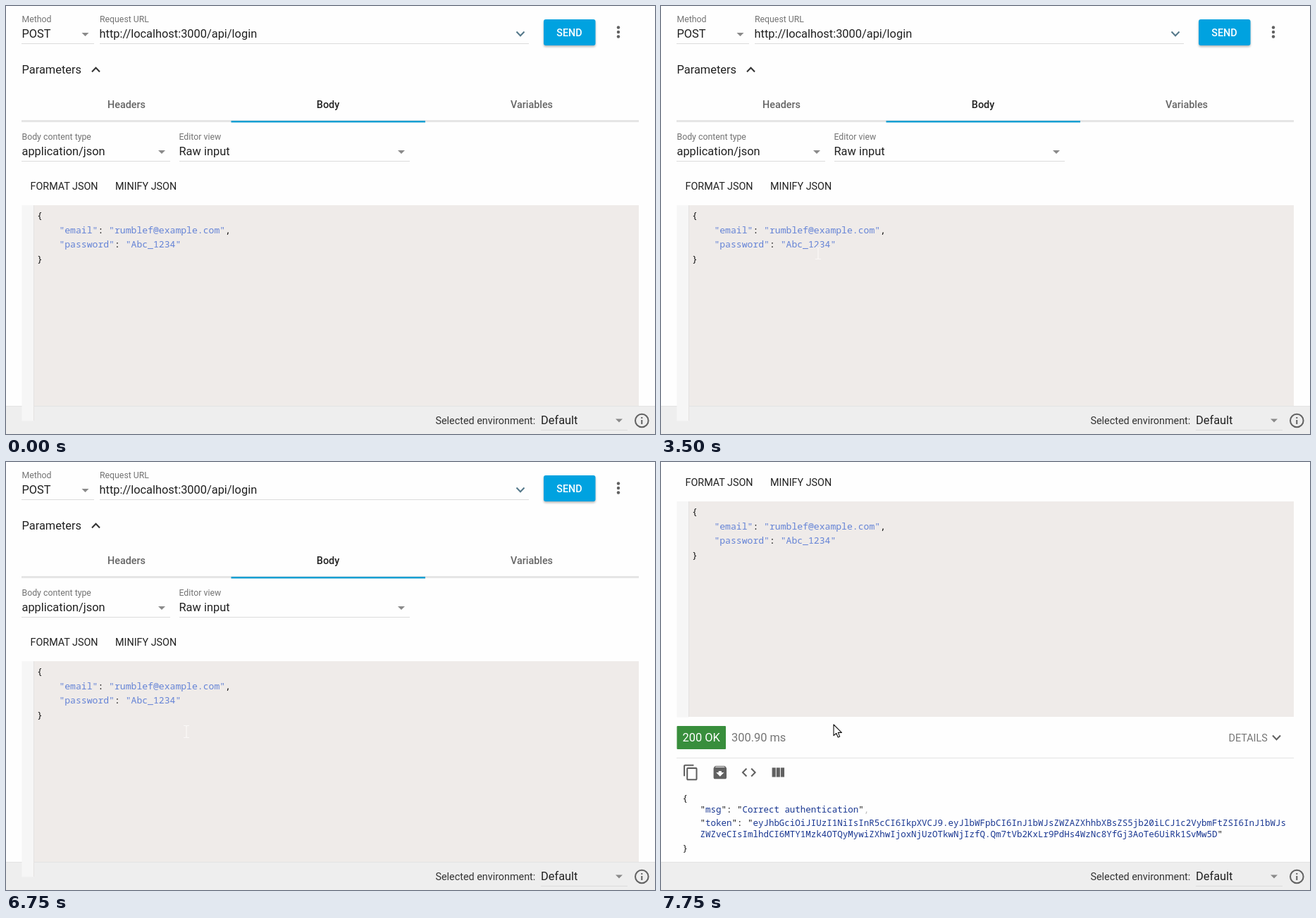
Animation of 921 by 608 pixels, one loop 8000 ms. Source, as an HTML page:

```html
<!DOCTYPE html>
<html lang="en">
<head>
<meta charset="utf-8">
<title>REST client login request</title>
<style>
html, body { margin: 0; width: 100%; height: 100%; overflow: hidden; background: #fefefe; }
svg { display: block; width: 100%; height: 100%; }
text { font: 16.4px Roboto, sans-serif; fill: #212121; white-space: pre; }
.label { font-size: 12.3px; fill: #737373; }
.small { font-size: 14.35px; }
.tab { font-size: 14.35px; font-weight: 500; fill: #656565; text-anchor: middle; }
.on { fill: #212121; }
.code { font: 13.1px "Noto Sans Mono", monospace; fill: #111; }
.code tspan { fill: #6483d6; }
.reply { font: 12.49px "Noto Sans Mono", monospace; fill: #111; }
.reply tspan { fill: #183691; }
.reply .faint { fill: #bbb; }
.grey { fill: #757575; }
.white { fill: #fff; }
.line { stroke: #dcdcdc; fill: none; }
.chevron { fill: none; stroke-width: 2; }
.drop { fill: #8a8a8a; }
.icon { fill: #616161; }
#send { fill: #00a2e0; filter: drop-shadow(0 2px 1.5px rgba(0,0,0,.28)); }
#send.pressed { filter: drop-shadow(0 3px 4px rgba(0,0,0,.4)); }
.pointer { display: none; }
.outline { fill: #fff; stroke: #111; stroke-width: 1.1; stroke-linejoin: round; }
</style>
</head>
<body>
<svg viewBox="0 0 921 608">
  <defs>
    <path id="caret" class="drop" d="M-5 -2.5H5L0 2.5Z"/>
    <path id="down" d="M-5.5 -3L0 2.7L5.5 -3"/>
  </defs>

  <g class="scroll">
    <text class="label" x="22.5" y="22.5">Method</text>
    <text x="22.5" y="45.2">POST</text>
    <use href="#caret" x="112.5" y="40.5"/>
    <text class="label" x="133" y="22.5">Request URL</text>
    <text x="132.5" y="45.2">http://localhost:3000/api/login</text>
    <use href="#down" class="chevron" stroke="#54788a" x="730" y="39.5"/>
    <path class="line" d="M22 53.5H125M133 53.5H742M22 220.5H233M246 220.5H573"/>
    <rect id="send" x="763" y="19" width="73.5" height="37" rx="3"/>
    <text class="tab white" x="799.5" y="43">SEND</text>
    <g class="icon">
      <circle cx="869" cy="30.5" r="2.2"/>
      <circle cx="869" cy="37" r="2.2"/>
      <circle cx="869" cy="43.5" r="2.2"/>
    </g>

    <text x="22.5" y="96">Parameters</text>
    <path class="chevron" stroke="#333" d="M122 93.5L127.5 87.8L133 93.5"/>

    <text class="tab" x="171" y="144.7">Headers</text>
    <text class="tab on" x="457" y="144.7">Body</text>
    <text class="tab" x="746" y="144.7">Variables</text>
    <rect x="22" y="162" width="876" height="3" fill="#e5e5e5"/>
    <rect x="319.5" y="163" width="275.5" height="2.5" fill="#179fd2"/>

    <text class="label" x="22.5" y="189.5">Body content type</text>
    <text x="22.5" y="212">application/json</text>
    <use href="#caret" x="221" y="207.5"/>
    <text class="label" x="245.5" y="189.5">Editor view</text>
    <text x="245.5" y="212">Raw input</text>
    <use href="#caret" x="561" y="207.5"/>

    <text class="small" x="34.5" y="261">FORMAT JSON</text>
    <text class="small" x="155" y="261">MINIFY JSON</text>

    <rect x="39" y="283" width="859" height="306" fill="#efebe9"/>
    <text class="code" x="44" y="302">{</text>
    <text class="code" x="75.4" y="322.5"><tspan>"email"</tspan>: <tspan>"rumblef@example.com"</tspan>,</text>
    <text class="code" x="75.4" y="343"><tspan>"password"</tspan>: <tspan>"Abc_1234"</tspan></text>
    <text class="code" x="44" y="363.5">}</text>

    <rect x="22.5" y="602" width="69.5" height="33" rx="1" fill="#388e3c"/>
    <text class="white" x="30.5" y="624">200 OK</text>
    <text class="grey" x="100" y="624">300.90 ms</text>
    <text class="small grey" x="805.5" y="623.5">DETAILS</text>
    <use href="#down" class="chevron" stroke="#616161" x="873.5" y="618.5"/>
    <path class="line" stroke-opacity=".8" d="M22 647.5H898"/>
    <g class="icon">
      <path transform="translate(30 655.7) scale(1.025)" d="M16 1H4c-1.1 0-2 .9-2 2v14h2V3h12V1zm3 4H8c-1.1 0-2 .9-2 2v14c0 1.1.9 2 2 2h11c1.1 0 2-.9 2-2V7c0-1.1-.9-2-2-2zm0 16H8V7h11v14z"/>
      <path transform="translate(71.5 655.7) scale(1.025)" d="M20.5 5.2l-1.4-1.7C18.9 3.2 18.5 3 18 3H6c-.5 0-.9.2-1.2.5L3.5 5.2C3.2 5.6 3 6 3 6.5V19c0 1.1.9 2 2 2h14c1.1 0 2-.9 2-2V6.5c0-.5-.2-.9-.5-1.3zM12 17.5L6.5 12H10v-2h4v2h3.5L12 17.5zM5.1 5l.8-1h12l.9 1H5.1z"/>
      <path transform="translate(112.5 655.7) scale(1.025)" d="M9.4 16.6L4.8 12l4.6-4.6L8 6l-6 6 6 6 1.4-1.4zm5.2 0l4.6-4.6-4.6-4.6L16 6l6 6-6 6-1.4-1.4z"/>
      <path transform="translate(153.5 656) scale(1.025)" d="M10 18h5V5h-5v13zM4 18h5V5H4v13zM16 5v13h5V5h-5z"/>
    </g>

    <text class="reply" x="30.5" y="709">{</text>
    <text class="reply" x="55.5" y="724.5">"<tspan>msg</tspan>": "<tspan>Correct authentication</tspan>"<tspan class="faint">,</tspan></text>
    <text class="reply" x="55.5" y="744">"<tspan>token</tspan>": "<tspan>eyJhbGciOiJIUzI1NiIsInR5cCI6IkpXVCJ9.eyJlbWFpbCI6InJ1bWJsZWZAZXhhbXBsZS5jb20iLCJ1c2VybmFtZSI6InJ1bWJs</tspan></text>
    <text class="reply" x="55.5" y="759.5"><tspan>ZWZveCIsImlhdCI6MTY1Mzk4OTQyMywiZXhwIjoxNjUzOTkwNjIzfQ.Qm7tVb2KxLr9PdHs4WzNc8YfGj3AoTe6UiRk1SvMw5D</tspan>"</text>
    <text class="reply" x="30.5" y="780">}</text>
  </g>

  <rect y="568" width="921" height="40" fill="#eee"/>
  <path class="line" stroke-opacity=".6" d="M0 568.5H921"/>
  <text class="small" x="609.5" y="594" style="fill:#333">Selected environment:</text>
  <text x="759" y="594">Default</text>
  <use href="#caret" x="870" y="589"/>
  <path class="line" d="M759 602.5H882"/>
  <circle cx="902.3" cy="589" r="9.3" fill="none" stroke="#616161" stroke-width="2"/>
  <path class="icon" d="M901.3 588h2v6h-2zM901.3 584h2v2h-2z"/>

  <!-- the editor gutter lies above the footer -->
  <g class="scroll">
    <rect x="22.5" y="283" width="17" height="306.5" fill="#f6f6f6"/>
    <path d="M39.5 283V589" stroke="#e4e2e1"/>
  </g>

  <g id="arrow" class="pointer">
    <path class="outline" d="M.5 .5V16.2L4.2 12.8L6.7 18.5L9.2 17.4L6.8 11.9H11.9Z"/>
  </g>
  <g id="beam" class="pointer">
    <path d="M-4 -8.5H-1L0 -7.5L1 -8.5H4M0 -7.5V7.5M-4 8.5H-1L0 7.5L1 8.5H4" fill="none" stroke="#faf8f7" stroke-width="1.2"/>
  </g>
  <g id="hand" class="pointer">
    <path class="outline" transform="translate(-6.5 -1)" d="M5 2.5a1.6 1.6 0 0 1 3.2 0v6l6 1.3c1.5.4 2.3 1.3 2.1 2.8l-.8 5.4-1.6 2.5v1.5H7v-2L1 13.4c-.9-1.4.7-2.6 2-1.7l2 1.6z"/>
  </g>
</svg>
<script>
const LOOP = 8000, STEP = 250;

// time, pointer shape, x, y
const path = [
  [250, 'arrow', 14, 236], [1000, 'arrow', 165, 75],
  [1250, 'beam', 203, 53], [1750, 'beam', 315, 53],
  [2000, 'arrow', 343, 51], [2250, 'arrow', 310, 180],
  [2500, 'beam', 238, 306], [2750, 'beam', 181, 330],
  [3500, 'beam', 223, 351], [3750, 'beam', 236, 360],
  [4000, 'beam', 330, 312], [4250, 'arrow', 490, 240],
  [5000, 'arrow', 763, 107], [5250, 'hand', 790, 48],
  [5500, 'hand', 805.5, 41], [6000, 'hand', 805.5, 41],
  [6250, 'hand', 814, 37], [6500, 'arrow', 520, 220],
  [6750, 'beam', 256, 383], [7500, 'beam', 256, 383],
  [7750, 'arrow', 244.5, 372.5]
];

const $ = id => document.getElementById(id);
const layers = document.querySelectorAll('.scroll');
const pointers = ['arrow', 'beam', 'hand'].map($);

function pointerAt(t) {
  const i = path.findLastIndex(key => key[0] <= t);
  if (i < 0) return null;
  const [t0, shape, x0, y0] = path[i];
  const [t1, , x1, y1] = path[i + 1] || [LOOP, shape, x0, y0];
  const k = (t - t0) / (t1 - t0);
  return { shape, x: x0 + (x1 - x0) * k, y: y0 + (y1 - y0) * k };
}

const scrollAt = t => t < 7250 ? 0 : t < 7500 ? 125 : 227;

function draw(now) {
  const t = Math.floor(now % LOOP / STEP) * STEP;
  const p = pointerAt(t);
  for (const g of layers) g.setAttribute('transform', `translate(0 ${-scrollAt(t)})`);
  for (const g of pointers) {
    const shown = p && p.shape === g.id;
    g.style.display = shown ? 'inline' : 'none';
    if (shown) g.setAttribute('transform', `translate(${p.x} ${p.y})`);
  }
  $('send').classList.toggle('pressed', t === 6000);
}

const start = performance.now();
function tick() {
  draw(performance.now() - start);
  requestAnimationFrame(tick);
}
tick();
</script>
</body>
</html>
```
